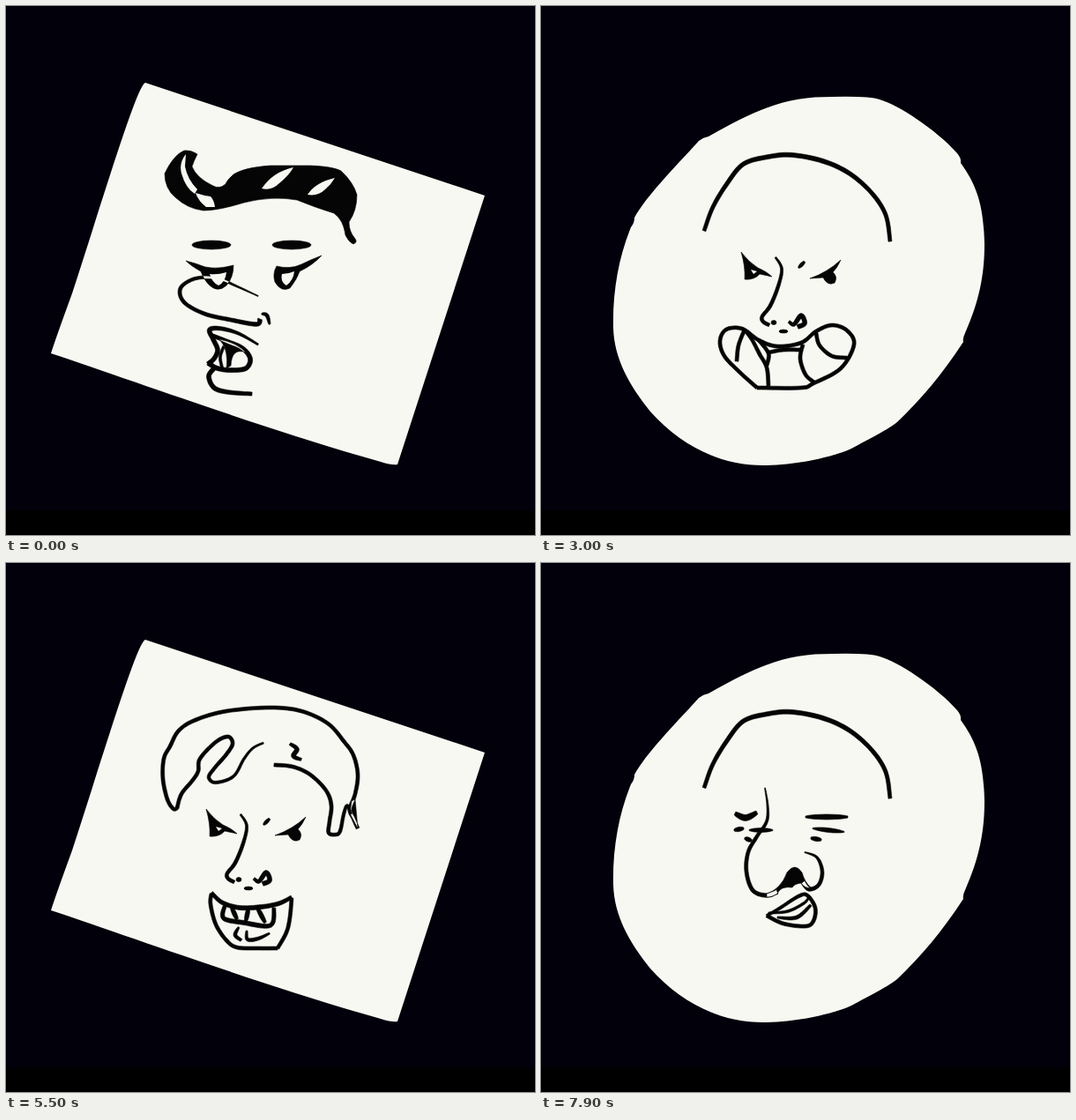
Write an HTML page that moves like this. It is 600 by 600 pixels and loops after 8 s.

```html
<!DOCTYPE html>
<html lang="en">
<head>
<meta charset="utf-8">
<title>Face mixer</title>
<style>
html, body { margin: 0; width: 100%; height: 100%; overflow: hidden; background: #02000a; }
svg { display: block; width: 100%; height: 100%; }
</style>
</head>
<body>
<svg viewBox="0 0 600 600">
  <rect width="600" height="600" fill="#02000a"/>
  <rect y="572" width="600" height="28" fill="#000"/>
  <path id="head" fill="#f8f8f2"/>
  <path id="ink" fill="#050505" fill-rule="nonzero" stroke="#050505" stroke-width=".6" stroke-linejoin="round"/>
  <path id="light" fill="#f8f8f2"/>
</svg>
<script>
const LOOP = 8000;

const heads = {
  card: 'M158 87L543 215L444 520Q438 521 425 517C300 482 150 427 51 394Q56 378 75 326C100 250 130 150 148 105Q155 88 158 87Z',
  disc: 'M256 521C300 520 340 508 352 502C372 491 395 480 405 471C430 447 455 418 479 381Q478 377 481 371C497 335 503 305 503 270C502 225 494 203 476 178Q477 173 472 167C448 140 405 112 384 106Q372 102 330 103C285 103 255 111 190 148Q184 149 179 153C150 185 120 215 106 240Q106 246 102 251C88 285 81 325 82 365C83 400 100 430 124 460C160 500 205 522 256 521Z',
  egg: 'M67 315C66 210 160 122 300 120C440 118 527 195 525 300C523 420 420 506 290 507C160 508 69 425 67 315Z'
};

// "a b c|x y ..." is a brush line with start, middle and end width; "M" a filled shape; "-M" a light one.
const parts = {
  quiff: [
    'M217 168Q209 163 202 164Q190 169 180 190Q180 207 192 217Q206 230 224 232Q241 232 270 223Q302 215 330 220Q352 229 372 235Q383 243 385 260Q389 268 394 270Q399 268 396 264Q389 256 389 245Q398 232 398 214Q394 200 380 187Q371 182 345 181L300 181Q270 183 258 191Q251 197 249 202Q242 208 235 204Q216 195 211 182Q213 176 217 168Z',
    '-M204 168Q196 178 199 190Q204 207 214 213L217 208Q206 197 203 182Z',
    '-M215 212Q224 215 232 216Q236 220 237 228L227 228Q218 221 215 212Z',
    '-M326 183Q303 188 290 207Q301 210 310 201Q321 192 326 183Z',
    '-M373 195Q351 200 342 214Q354 216 362 208Q369 202 373 195Z'
  ],
  sweep: [
    '6 4 5|160 291 153 280 149 250 149 222 158 209 185 205 215 190 245 174 285 168 320 169 352 176 378 196 393 222 397 245 392 268 380 280 368 278',
    '6 4 3|160 291 164 265 172 238 190 224 230 214 255 208 266 193',
    '3 4 3|161 212 200 205 240 192 262 191 267 196 258 208 235 213 190 221',
    '3 4 4|264 194 288 183 322 182 345 200 368 222 350 215 330 209 300 215 275 213 255 220 240 226 237 240 231 235 231 220',
    '4 4 4|236 234 250 224 285 222 308 228 324 243 321 225 313 211',
    '2 4 2|281 205 303 200', '2 3 2|322 182 332 190',
    '3 4 4|366 222 382 240 386 258 376 272 368 277 371 262 368 240 352 222 330 207'
  ],
  spikes: [
    '2 6 2|169 232 180 244', '2 5 2|190 219 193 240', '1 5 2|216 193 221 215', '2 5 2|255 190 250 217',
    '3 5 3|283 194 283 216', '1 5 2|311 197 316 215', '2 6 2|339 199 350 216', '1 5 3|379 195 382 220',
    '1 5 2|409 225 396 261', '1 5 2|385 270 375 295', '1 5 2|434 279 404 289'
  ],
  tuft: [
    'M391 236Q394 226 404 226Q414 229 419 240Q427 254 430 269Q423 279 421 297L406 287L400 295Q392 285 384 270Q377 267 372 262L374 247L389 250Q387 243 391 236Z',
    '-M394 238Q399 239 397 248Q392 245 394 238Z', '-M402 239Q406 243 405 250Q400 246 402 239Z',
    '-M412 244Q418 249 415 253Q410 252 412 244Z', '-M395 260Q396 268 390 272Q388 266 395 260Z'
  ],
  drip: [
    '4 4 4|195 277 190 279 183 268 178 245 179 222 186 208 196 190 215 178 250 168 300 164 335 168 365 182 383 202 394 218 399 240 396 262 390 279 394 290 399 301',
    '3 4 4|391 285 387 275 383 285 379 304 374 308 366 306 367 293 369 275 363 258 345 240 325 231 304 229',
    '4 4 2|194 278 199 262 212 246 218 236 220 222 238 203 252 197 257 205 250 217 237 232 230 243 238 249 258 242 270 222 280 210 292 204',
    '3 5 3|322 205 330 211 326 219 335 223', 'M392 270L396 268L399 301L390 284Z'
  ],
  dome: ['4 5 4|185 255 195 228 212 200 230 179 258 171 285 169 320 176 350 190 375 212 391 237 396 267'],

  flat: [oval(233, 271, 22, 5), oval(324, 271, 22, 5)],
  dots: [oval(213, 266, 14, 4.5, -5), oval(235, 270, 5, 2.5, 60), oval(308, 267, 7, 3, -40), oval(334, 266, 16, 4.5, 4)],

  lash: [
    'M204 289Q216 292 226 296Q240 299 258 294Q258 308 250 317Q240 326 230 316Q224 310 221 301Q210 295 204 289Z',
    '-M231 304Q240 305 250 302Q249 313 241 317Q234 314 231 304Z',
    'M358 283Q345 288 335 293Q322 299 307 295Q302 303 305 313Q312 325 322 320Q330 310 333 301Q348 294 358 283Z',
    '-M313 304Q320 304 327 301Q326 311 318 317Q311 313 313 304Z'
  ],
  wedge: [
    'M217 299Q232 292 242 281Q240 296 238 304Q228 299 217 299Z', oval(223, 315, 10, 3),
    'M296 276Q305 289 324 296Q325 302 313 302L302 305Q300 292 296 276Z', oval(312, 319, 11, 2.7)
  ],
  bean: [246, 322].flatMap(x => [
    `M${x - 8} 309Q${x - 8} 291 ${x} 290Q${x + 8} 291 ${x + 8} 307Q${x + 7} 315 ${x} 316Q${x - 7} 316 ${x - 8} 309Z`,
    '-' + oval(x, 304, 3.5, 9)
  ]),
  glare: [
    'M227 279Q235 290 246 297Q256 301 262 307L248 304Q242 311 231 310Q232 296 227 279Z',
    '-M238 299L245 301L241 304Z',
    'M340 288Q336 297 331 302Q337 307 333 314Q325 318 320 308L305 309Q325 302 340 288Z', '2 4 1|299 290 292 297'
  ],
  seed: [oval(224, 299, 8, 13, -32), oval(319, 300, 8, 14, 40)],
  doze: [
    '4 7 4|220 284 232 289 245 283', '2 5 2|219 303 230 301', '2 5 2|231 312 239 315', '1 5 1|236 303 263 303',
    '2 6 2|300 288 348 288', '1 5 1|308 301 344 305', '2 5 2|306 312 318 314'
  ],

  hook: ['1 4 5|286 329 262 318 240 309 215 309 198 320 202 336 225 349 255 356 284 361 288 355', '2 4 2|290 349 296 351 299 361'],
  long: [
    '2 4 5|276 257 285 270 286 284 272 308 255 330 240 349 233 361 237 371 255 378 275 379 284 376',
    '4 5 2|238 373 230 380 231 389', '2 5 4|303 354 307 363 304 371 295 378'
  ],
  bulb: [
    '1 4 5|254 255 257 275 256 293 245 310 235 328 233 350 240 371 255 377 268 373',
    'M256 375Q272 370 279 351Q288 339 296 351Q299 362 306 368Q300 370 295 363Q287 364 285 368Q272 366 268 375Q262 380 256 379Z',
    '1 4 5|299 328 313 334 319 350 315 365 304 370 297 362'
  ],
  step: ['2 4 4|260 289 263 305 262 325 259 342 251 350 250 363 258 368 275 369 297 368'],
  slim: [
    '2 4 4|266 285 273 298 269 318 260 340 251 352 252 358 259 362', oval(264, 359, 3, 2.5), oval(275, 369, 5, 2),
    '3 5 5|281 358 287 361 295 351 299 360 291 364'
  ],

  talk: [
    '2 5 5|286 384 265 372 245 366 231 367 235 378 240 390 236 400 229 406',
    '4 5 5|232 373 250 380 268 388 277 400 272 411 255 413 240 411 229 405',
    'M242 378Q262 382 272 393Q256 387 255 408L250 411Q253 390 242 378Z',
    '3 3 3|247 386 243 398 245 410', '5 5 4|236 411 230 420 236 433 252 438 279 440'
  ],
  frown: [
    'M249 387Q262 394 275 392Q290 392 301 382Q293 392 300 407Q288 403 277 398Q262 396 246 406Q250 398 249 387Z',
    '2 3 1|310 370 320 383 323 397'
  ],
  pout: [
    '2 4 2|241 373 235 380 233 392', '1 4 3|302 372 313 379 319 393',
    '5 5 3|250 401 262 394 280 391 298 396 300 402 285 408 256 410', '5 3 3|249 399 270 401 298 398'
  ],
  roar: [
    '4 5 4|233 374 245 385 265 391 290 390 310 386 324 379',
    '4 4 4|233 375 232 387 238 410 250 428 262 436 285 437 308 437',
    '4 4 4|308 437 318 419 322 402 324 380',
    '4 5 4|248 389 247 403 270 408 300 411 304 391',
    '3 5 3|256 391 262 404', '3 5 3|275 392 272 406', '3 5 3|285 391 294 408',
    '2 4 3|264 413 260 422 267 428', '2 4 2|273 417 274 427 286 426 299 420'
  ],
  grin: [
    '4 4 4|245 433 225 415 208 397 203 380 210 367 228 366 247 379 268 386 295 382 312 369 330 362 347 368 355 384 340 411 309 428 295 433 245 433',
    '4 4 4|231 367 224 385 222 403', '3 4 4|231 368 239 378 248 395 256 410 258 431',
    '4 4 4|247 379 258 394 256 408', '4 4 4|258 393 275 390 296 390',
    '4 4 4|297 384 294 400 300 418 310 427', '4 4 4|312 371 316 385 330 397 347 399'
  ],
  lips: [
    '3 4 4|256 400 270 392 292 378 302 377 311 391 309 406 300 412 275 409 256 400',
    '2 4 3|268 402 290 402 306 388', '2 3 2|258 397 280 395 298 386 304 379'
  ]
};

// Start time, head, parts
const scenes = [
  [0, 'card', 'quiff flat lash hook talk'],
  [500, 'card', 'drip flat bean long roar'],
  [1200, 'disc', 'sweep flat lash long frown'],
  [1800, 'egg', 'quiff dots seed step lips'],
  [2400, 'card', 'spikes wedge bulb'],
  [3000, 'disc', 'dome glare slim grin'],
  [3600, 'card', 'tuft bean step pout'],
  [4300, 'egg', 'sweep doze bulb lips'],
  [4900, 'disc', 'spikes flat lash slim frown'],
  [5500, 'card', 'drip glare slim roar'],
  [6100, 'disc', 'quiff wedge long pout'],
  [6700, 'card', 'sweep dots seed bulb grin'],
  [7300, 'disc', 'sweep bean step pout'],
  [7900, 'disc', 'dome doze bulb lips']
];

function oval(x, y, rx, ry, turn = 0) {
  const a = turn * Math.PI / 180, dx = rx * Math.cos(a), dy = rx * Math.sin(a);
  const arc = (sx, sy) => `A${rx} ${ry} ${turn} 1 1 ${x + sx} ${y + sy}`;
  return `M${x - dx} ${y - dy}${arc(dx, dy)}${arc(-dx, -dy)}Z`;
}

function spline(a, b, c, d, t) {
  return b + t * (c - a + t * (2 * a - 5 * b + 4 * c - d + t * (3 * b - a - 3 * c + d))) / 2;
}

function brush(text) {
  const [sizes, coords] = text.split('|').map(s => s.split(' ').map(Number));
  const pts = [];
  for (let i = 0; i < coords.length; i += 2) pts.push([coords[i], coords[i + 1]]);
  const last = pts.length - 1, steps = 8;
  const at = u => {
    const i = Math.min(last - 1, Math.floor(u));
    const near = [-1, 0, 1, 2].map(k => pts[Math.max(0, Math.min(last, i + k))]);
    return [0, 1].map(k => spline(...near.map(p => p[k]), u - i));
  };
  const left = [], right = [];
  for (let n = 0; n <= last * steps; n++) {
    const u = n / steps, f = u / last;
    const [x, y] = at(u), p = at(Math.max(0, u - .05)), q = at(Math.min(last, u + .05));
    const dx = q[0] - p[0], dy = q[1] - p[1], len = Math.hypot(dx, dy) || 1;
    const [w0, w1, w2] = sizes;
    const edge = f < .5 ? w0 : w2;
    const r = (edge + (w1 - edge) * Math.sin(f * Math.PI)) / 2;
    left.push(`${(x - dy / len * r).toFixed(1)} ${(y + dx / len * r).toFixed(1)}`);
    right.unshift(`${(x + dy / len * r).toFixed(1)} ${(y - dx / len * r).toFixed(1)}`);
  }
  return 'M' + left.concat(right).join('L') + 'Z';
}

const frames = scenes.map(([start, head, names]) => {
  let ink = '', light = '';
  for (const item of names.split(' ').flatMap(n => parts[n])) {
    if (item[0] === '-') light += item.slice(1);
    else ink += item[0] === 'M' ? item : brush(item);
  }
  return { start, head: heads[head], ink, light };
});

const layers = ['head', 'ink', 'light'];
let shown;

function draw(ms) {
  const t = ms % LOOP;
  const frame = frames.findLast(f => f.start <= t) || frames[0];
  if (frame === shown) return;
  shown = frame;
  for (const id of layers) document.getElementById(id).setAttribute('d', frame[id]);
}

const begin = performance.now();
function tick() {
  draw(performance.now() - begin);
  requestAnimationFrame(tick);
}
tick();
</script>
</body>
</html>
```
